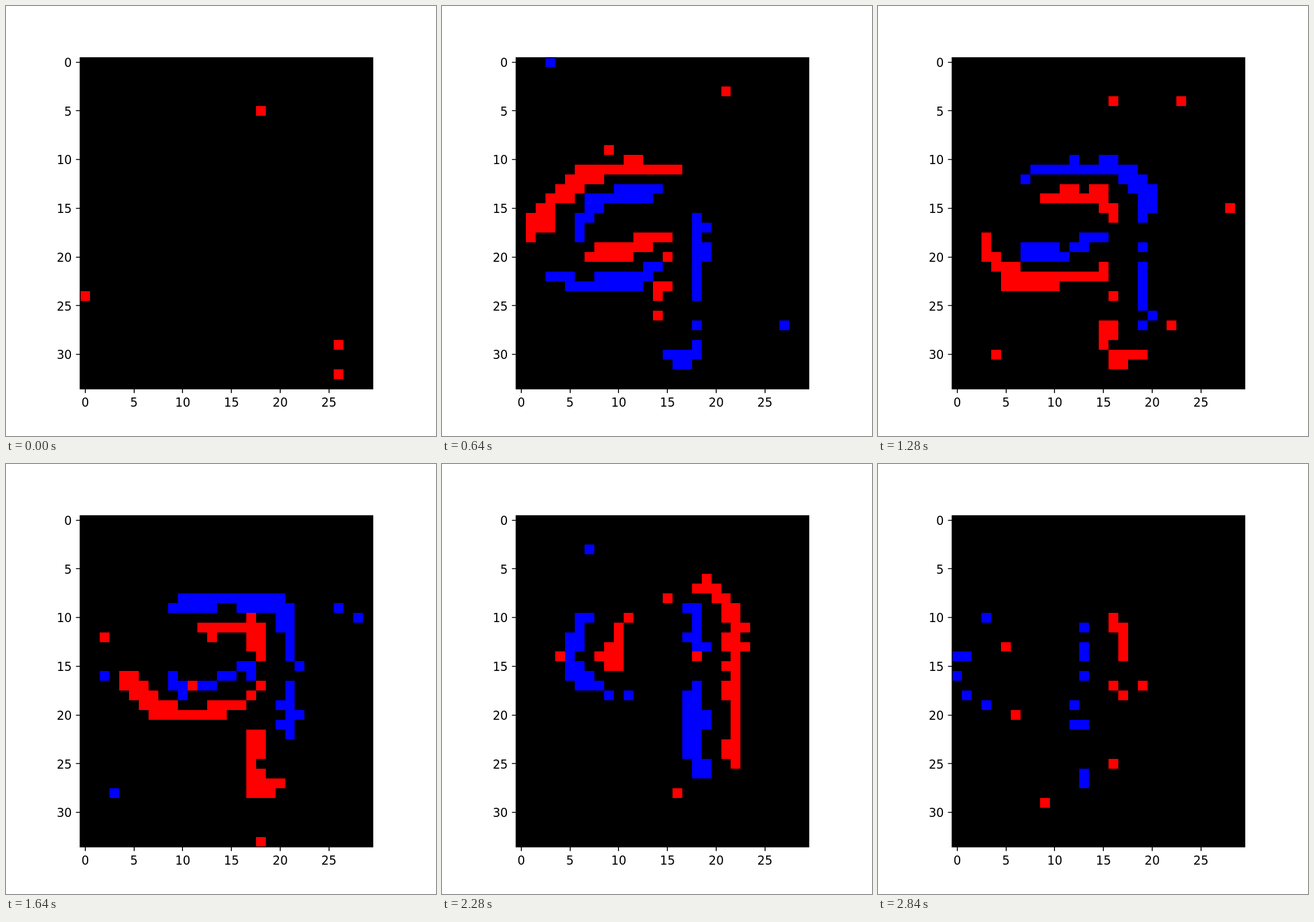
An HTML page for the animation above (2880 ms loop, 748 by 748 pixels).

```html
<!DOCTYPE html>
<html lang="en">
<head>
<meta charset="utf-8">
<title>Event camera digit</title>
<style>
  html, body { margin: 0; width: 100%; height: 100%; overflow: hidden; background: #fff; }
  svg { display: block; width: 100%; height: 100%; }
  text { font: 20.8px "DejaVu Sans", sans-serif; }
</style>
</head>
<body>
<svg id="plot" viewBox="0 0 748 748">
  <rect x="129" y="90" width="509" height="576"/>
  <path id="blue" fill="#00f" shape-rendering="crispEdges"/>
  <path id="red" fill="#f00" shape-rendering="crispEdges"/>
  <rect x="129" y="90" width="509" height="576" fill="none" stroke="#000" stroke-width="1.67"/>
  <path id="ticks" stroke="#000" stroke-width="1.67"/>
</svg>
<script>
const COLS = 30, ROWS = 34, CELL = 16.958, LEFT = 129.4, TOP = 89.06;
const TICK_MS = 40, TICKS = 72;
const plot = document.getElementById('plot');

// Centre line of the digit 9, from its foot up and around the loop, in cells.
const NINE = [
  [17, 26], [17, 18], [17.3, 13], [16, 9.6], [12, 9.4], [8, 10],
  [5.3, 12.8], [4.5, 16], [7, 18.2], [11, 18], [15, 16.3]
];
const STROKE = { x: 2.2, y: 1.6 };

// The camera rests at these offsets and sweeps from one to the next.
const RESTS = [
  { tick: 0, x: -2.6, y: 0 },
  { tick: 24, x: -0.4, y: 4 },
  { tick: 52, x: 3.5, y: -1.8 },
  { tick: 73, x: -2.6, y: 0 }
];

function random(...keys) {
  let h = 2166136261;
  for (const key of keys) {
    h = Math.imul(h ^ key, 16777619);
    h = Math.imul(h ^ h >>> 15, 2246822507);
  }
  return ((h ^ h >>> 13) >>> 0) / 4294967296;
}

// Catmull-Rom spline through the points, sampled evenly.
function smooth(points, samples) {
  const at = i => points[Math.max(0, Math.min(points.length - 1, i))];
  const curve = [];
  for (let i = 0; i < points.length - 1; i++) {
    const [a, b, c, d] = [at(i - 1), at(i), at(i + 1), at(i + 2)];
    for (let s = 0; s < samples; s++) {
      const t = s / samples;
      curve.push([0, 1].map(k => b[k] + t / 2 * (c[k] - a[k]
        + t * (2 * a[k] - 5 * b[k] + 4 * c[k] - d[k]
        + t * (3 * (b[k] - c[k]) + d[k] - a[k])))));
    }
  }
  return [...curve, at(points.length - 1)];
}

const curve = smooth(NINE, 8);

function brightness(x, y) {
  let nearest = Infinity;
  for (const [px, py] of curve) {
    nearest = Math.min(nearest, ((x - px) / STROKE.x) ** 2 + ((y - py) / STROKE.y) ** 2);
  }
  return Math.exp(-(nearest ** 1.5));
}

function cameraAt(tick) {
  const next = RESTS.findIndex(rest => tick < rest.tick);
  const from = RESTS[next - 1], to = RESTS[next];
  const phase = Math.PI * (tick - from.tick) / (to.tick - from.tick);
  const eased = (1 - Math.cos(phase)) / 2;
  const dx = to.x - from.x, dy = to.y - from.y, length = Math.hypot(dx, dy);
  return {
    x: from.x + dx * eased,
    y: from.y + dy * eased,
    ux: dx / length,
    uy: dy / length,
    speed: Math.sin(phase) ** 0.7
  };
}

// Brightening cells fire blue, darkening cells fire red; a few fire by chance.
function eventsAt(tick) {
  const { x, y, ux, uy, speed } = cameraAt(tick);
  const cells = { red: new Set(), blue: new Set() };
  for (let row = 0; row < ROWS; row++) {
    for (let col = 0; col < COLS; col++) {
      const cx = col - x, cy = row - y;
      const change = speed * (brightness(cx - ux / 2, cy - uy / 2) - brightness(cx + ux / 2, cy + uy / 2));
      const threshold = 0.1 + 0.22 * random(tick, col, row);
      if (Math.abs(change) > threshold) cells[change > 0 ? 'blue' : 'red'].add(row * COLS + col);
    }
  }
  const specks = 3 + Math.floor(random(tick, 1) * 5);
  for (let i = 0; i < specks; i++) {
    const colour = random(tick, i, 2) < 0.65 ? 'red' : 'blue';
    cells[colour].add(Math.floor(random(tick, i, 3) * COLS * ROWS));
  }
  return cells;
}

function cellPath(cells) {
  const edgeX = c => Math.round(LEFT + CELL * c), edgeY = r => Math.round(TOP + CELL * r);
  return [...cells].map(cell => {
    const c = cell % COLS, r = Math.floor(cell / COLS);
    return `M${edgeX(c)} ${edgeY(r)}H${edgeX(c + 1)}V${edgeY(r + 1)}H${edgeX(c)}z`;
  }).join('');
}

function addLabel(value, x, y, anchor) {
  const label = document.createElementNS(plot.namespaceURI, 'text');
  label.setAttribute('x', x);
  label.setAttribute('y', y);
  label.setAttribute('text-anchor', anchor);
  label.textContent = value;
  plot.append(label);
}

function drawAxes() {
  let d = '';
  for (let v = 0; v < ROWS; v += 5) {
    const x = LEFT + CELL * (v + 0.5), y = TOP + CELL * (v + 0.5);
    d += `M129 ${Math.round(y)}h-7.3`;
    addLabel(v, 114.6, Math.round(y + 8.2), 'end');
    if (v < COLS) {
      d += `M${Math.round(x)} 666v7.3`;
      addLabel(v, x, 697, 'middle');
    }
  }
  document.getElementById('ticks').setAttribute('d', d);
}

let shown = -1;
function draw() {
  const tick = Math.floor(performance.now() / TICK_MS) % TICKS;
  if (tick !== shown) {
    shown = tick;
    const cells = eventsAt(tick);
    for (const colour in cells) {
      document.getElementById(colour).setAttribute('d', cellPath(cells[colour]));
    }
  }
  requestAnimationFrame(draw);
}

drawAxes();
draw();
</script>
</body>
</html>
```
